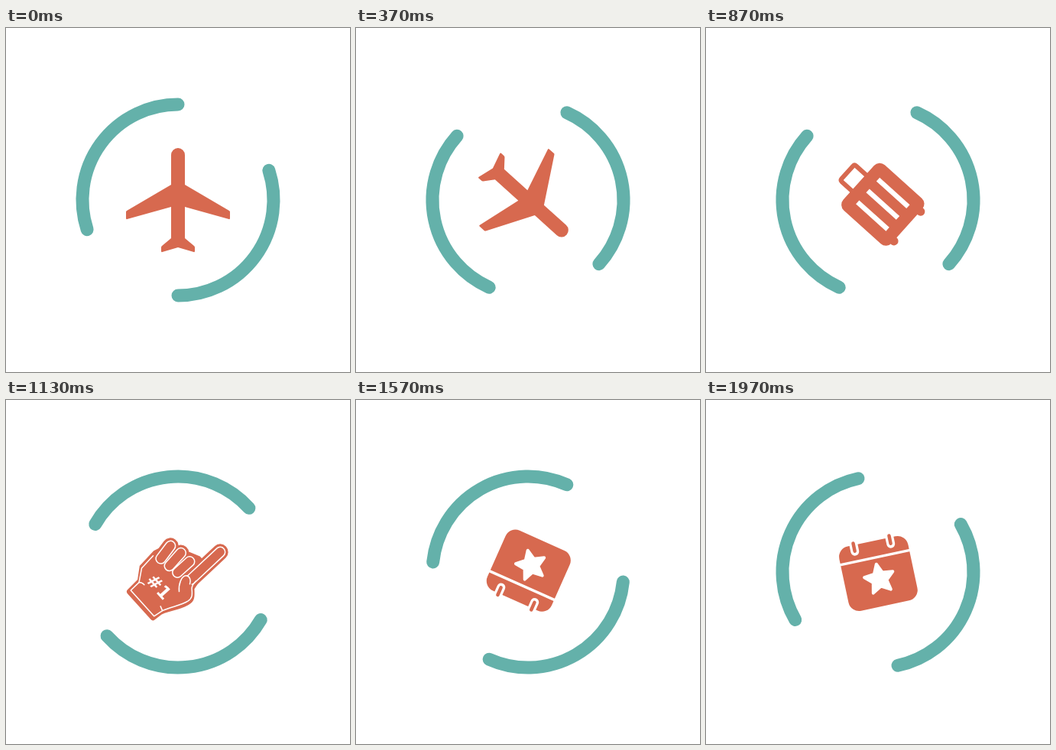
An HTML page that plays this animation: 450x450 px, repeating every 2 s.

```html
<!DOCTYPE html>
<html lang="en">
<head>
<meta charset="utf-8">
<title>Travel loader</title>
<style>
  html, body { margin: 0; width: 100%; height: 100%; overflow: hidden; background: #fff; }
  svg { display: block; width: 100vw; height: 100vh; }
  .ink { fill: #d7694f; }
  .ink-line { fill: none; stroke: #d7694f; stroke-linecap: round; stroke-linejoin: round; }
  .gap { fill: #fff; }
  .gap-line { fill: none; stroke: #fff; stroke-linecap: round; stroke-linejoin: round; }
  .ring { fill: none; stroke: #64b1aa; stroke-width: 17; stroke-linecap: round; }
  text { font: bold 23px "DejaVu Sans", sans-serif; }
</style>
</head>
<body>
<svg viewBox="-225 -225 450 450">
  <g id="spinner">
    <g class="ring" id="ring"></g>

    <g class="icon">
      <path class="ink" d="M-9-59A9 9 0 0 1 9-59V-20L67 14Q68 14.500 68 15.500V24Q68 25.500 66.500 25L9 9V50L21 60Q22 61 22 62V67Q22 68.500 20.500 68L0 62L-20.500 68Q-22 68.500-22 67V62Q-22 61-21 60L-9 50V9L-66.500 25Q-68 25.500-68 24V15.500Q-68 14.500-67 14L-9-20Z"/>
    </g>

    <g class="icon">
      <path class="ink-line" stroke-width="6" d="M-14-32V-51Q-14-54-11-54H11Q14-54 14-51V-32"/>
      <circle class="ink" cx="-26" cy="51.500" r="5.700"/>
      <circle class="ink" cx="26" cy="51.500" r="5.700"/>
      <rect class="ink" x="-40" y="-34" width="80" height="85" rx="10"/>
      <path d="M-20-18V35M0-18V35M20-18V35" stroke="#fff" stroke-width="6.500"/>
    </g>

    <g class="icon">
      <path class="ink" d="M-27 64Q-27 68-23 68H22Q26 68 26 64L27 53C30 42 38 32 41 19C44 9 38 5 31-1L28-12V-35H4L-36-16L-42 5L-39.500 32L-28 46Z"/>
      <g id="fingers"></g>
      <path class="ink" d="M20 16C13 11 6 0 12-5C18-8 23-4 24-2L32 6Z"/>
      <g class="gap-line" stroke-width="1.500">
        <path d="M20 16C13 11 6 0 11-5C15-8 20-5 22-1"/>
        <path d="M24.500-10Q24.500-3 28 1C35 6 38 9 37 16C35 27 27 38 24 49L22 62H-23.500L-24 47L-35.500 32L-37.500 10"/>
        <path d="M-24 47Q-21 44-17 44M24 49L18 47"/>
      </g>
      <text class="gap" x="-20" y="39.500">#1</text>
    </g>

    <g class="icon">
      <rect class="ink" x="-46" y="-41" width="92" height="86" rx="14"/>
      <path d="M-48-19.300H48" stroke="#fff" stroke-width="3.500"/>
      <path class="gap-line" stroke-width="11" d="M-24-44V-32.500M24-44V-32.500"/>
      <path class="ink-line" stroke-width="4.500" d="M-24-43.500V-33M24-43.500V-33"/>
      <polygon id="star" class="gap gap-line" style="fill:#fff" stroke-width="4"/>
    </g>
  </g>
</svg>
<script>
  const LOOP = 2000, FRAMES = 60, ARC = 108, RADIUS = 125;
  const byId = id => document.getElementById(id);
  const icons = [...document.querySelectorAll('.icon')];

  // Angles run clockwise from the top.
  function polar(radius, degrees, cy = 0) {
    const a = degrees * Math.PI / 180;
    return [radius * Math.sin(a), cy - radius * Math.cos(a)].map(v => v.toFixed(2)).join(' ');
  }

  byId('ring').innerHTML = [0, 180].map(head =>
    `<path d="M${polar(RADIUS, head - ARC)}A${RADIUS} ${RADIUS} 0 0 1 ${polar(RADIUS, head)}"/>`
  ).join('');

  byId('star').setAttribute('points',
    Array.from({ length: 10 }, (_, i) => polar(i % 2 ? 9.5 : 20, i * 36, 9.5)).join(' '));

  const fingers = ['M17.5-58.500L18.500-6', 'M-32-15.500L-28 5', 'M-16-19.500L-13.500 3', 'M0-20.500V1'];
  const stroke = (d, cls, width) => `<path class="${cls}" stroke-width="${width}" d="${d}"/>`;
  byId('fingers').innerHTML =
    fingers.map(d => stroke(d, 'ink-line', 21)).join('') +
    fingers.map(d => stroke(d, 'gap-line', 14.5) + stroke(d, 'ink-line', 11.5)).join('');

  function render(ms) {
    // Frame starts fall on multiples of 10 ms, hence the small lead.
    const frame = Math.floor((ms % LOOP + 3.4) * FRAMES / LOOP) % FRAMES;
    const current = Math.floor(frame * icons.length / FRAMES);
    byId('spinner').setAttribute('transform', `rotate(${frame * 720 / FRAMES})`);
    icons.forEach((icon, i) => icon.style.display = i === current ? '' : 'none');
  }

  function tick(now) {
    render(now);
    requestAnimationFrame(tick);
  }
  render(0);
  requestAnimationFrame(tick);
</script>
</body>
</html>
```
